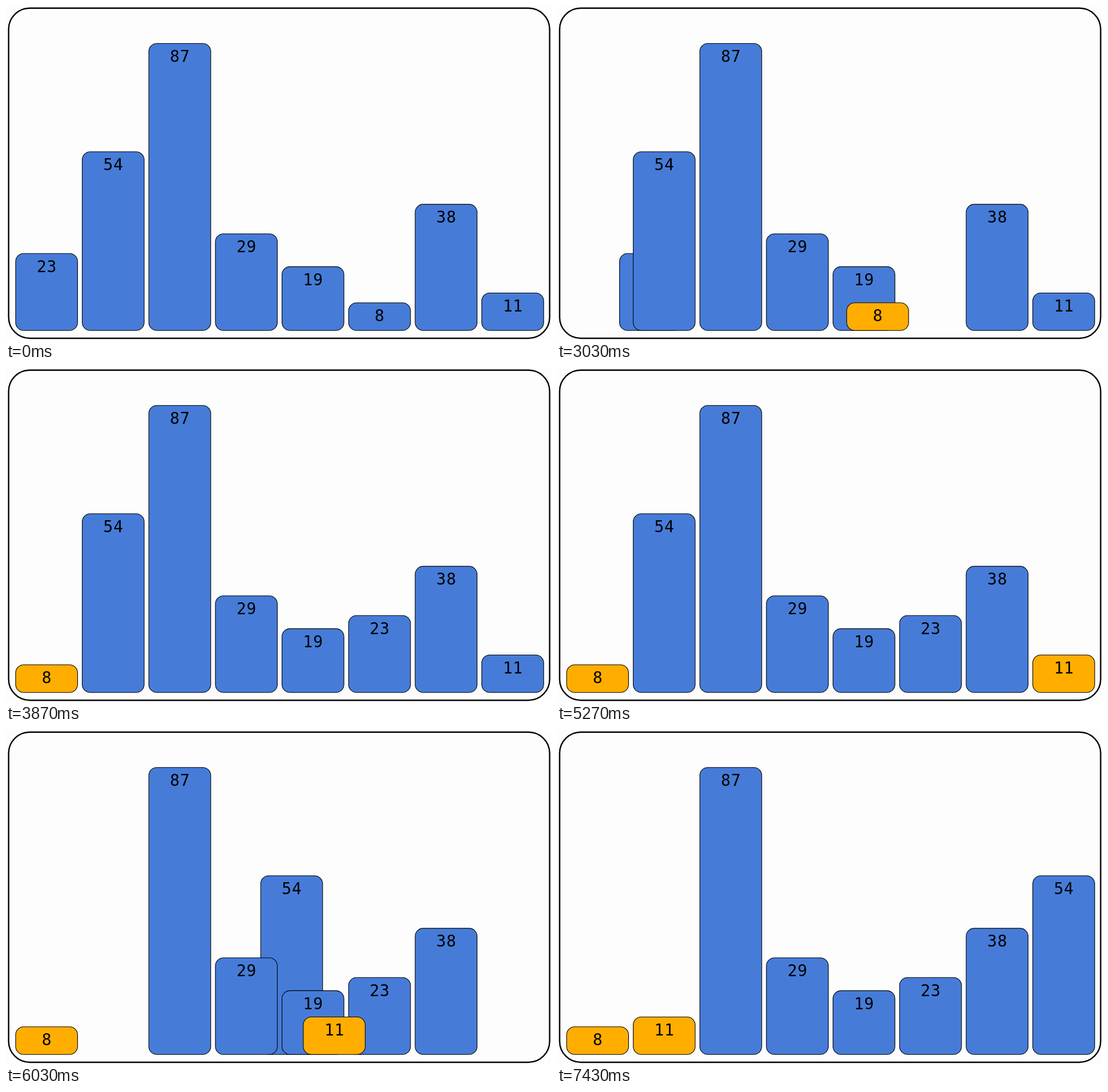
An HTML page with a canvas that plays this animation: 955 px wide and 586 px high, repeating every 8 s.

```html
<!DOCTYPE html>
<html lang="en">
<head>
<meta charset="utf-8">
<title>Sorting bars</title>
<style>
  html, body { margin: 0; width: 100%; height: 100%; overflow: hidden; background: #fdfdfe; }
  canvas { display: block; }
</style>
</head>
<body>
<canvas id="stage" width="955" height="586"></canvas>
<script>
const ctx = document.getElementById('stage').getContext('2d');
const LOOP = 8000;
const MOVE = 1000;
const BLUE = '#467cd8', ORANGE = '#ffae00', INK = '#000', PAPER = '#fdfdfe';
const FLOOR = 569.2, LEFT = 16.9, STEP = 116.68, WIDTH = 108.5, UNIT = 5.76;

const values = [23, 54, 87, 29, 19, 8, 38, 11];

// The bars at slots a and b trade places; b holds the minimum.
const swaps = [
  { a: 0, b: 5, mark: 2470, start: 2770 },
  { a: 1, b: 7, mark: 5270, start: 5565 }
];

const easeInOutSine = p => (1 - Math.cos(Math.PI * p)) / 2;
const clamp = p => Math.min(1, Math.max(0, p));

function roundBox(x, y, w, h, r) {
  ctx.beginPath();
  ctx.roundRect(x, y, w, h, r);
}

function drawBar(value, slot, color) {
  const h = value * UNIT + 2.4;
  const x = LEFT + slot * STEP;
  const y = FLOOR - h;
  roundBox(x, y, WIDTH, h, 14);
  ctx.fillStyle = color;
  ctx.fill();
  ctx.lineWidth = 1.1;
  ctx.stroke();
  ctx.fillStyle = INK;
  ctx.fillText(value, x + WIDTH / 2 + 0.4, y + 32.3);
}

function draw(t) {
  ctx.fillStyle = PAPER;
  ctx.fillRect(0, 0, 955, 586);
  ctx.strokeStyle = INK;
  ctx.lineWidth = 2.4;
  roundBox(4.6, 3.8, 948, 579.2, 37);
  ctx.stroke();

  const slots = values.map((_, i) => i);
  const colors = values.map(() => BLUE);
  for (const { a, b, mark, start } of swaps) {
    const shift = (b - a) * easeInOutSine(clamp((t - start) / MOVE));
    slots[a] = a + shift;
    slots[b] = b - shift;
    if (t >= mark) colors[b] = ORANGE;
  }

  ctx.font = '28px "DejaVu Sans Mono", monospace';
  ctx.letterSpacing = '0.8px';
  ctx.textAlign = 'center';
  values.forEach((v, i) => drawBar(v, slots[i], colors[i]));
}

const origin = performance.now();
function tick() {
  draw((performance.now() - origin) % LOOP);
  requestAnimationFrame(tick);
}
tick();
</script>
</body>
</html>
```
